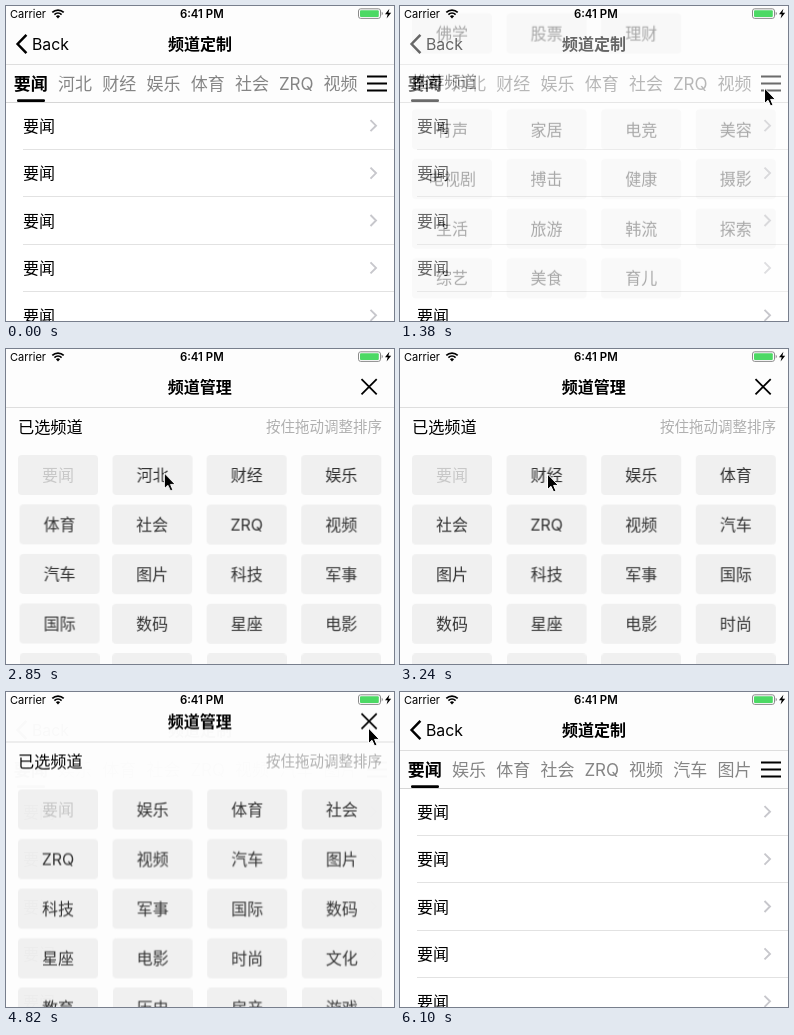
These frames come from a looping animation (388x315 px, 6430 ms). An HTML page:

```html
<!DOCTYPE html>
<html lang="zh-CN">
<head>
<meta charset="utf-8">
<title>频道定制</title>
<style>
html, body { margin: 0; width: 100%; height: 100%; overflow: hidden; background: #fff; }
svg { display: block; width: 388px; height: 315px; }
text { font-family: Inter, "Noto Sans CJK SC", "Noto Sans CJK", sans-serif; white-space: pre; }
</style>
</head>
<body>
<svg id="stage" viewBox="0 0 388 315"></svg>
<script>
const LOOP = 6430;
const NS = 'http://www.w3.org/2000/svg';
const stage = document.getElementById('stage');

function add(parent, tag, attrs = {}) {
  const el = document.createElementNS(NS, tag);
  for (const key in attrs) el.setAttribute(key, attrs[key]);
  parent.appendChild(el);
  return el;
}
const group = parent => add(parent, 'g');

function rect(parent, x, y, width, height, fill, rx = 0) {
  return add(parent, 'rect', { x, y, width, height, fill, rx });
}
function line(parent, d, stroke, width) {
  return add(parent, 'path', { d, stroke, fill: 'none', 'stroke-width': width });
}
// Text placed by its vertical centre
function label(parent, str, x, cy, size, fill = '#000', anchor = 'start', weight = 400) {
  const el = add(parent, 'text', {
    x, y: cy + size * 0.37, fill, 'font-size': size, 'font-weight': weight, 'text-anchor': anchor
  });
  el.textContent = str;
}

// steps: [time, properties, easing towards the next step]
function play(el, steps) {
  const all = [[0, steps[0][1]], ...steps, [LOOP, steps[steps.length - 1][1]]];
  el.animate(
    all.map(([t, props, easing = 'linear']) => ({ offset: t / LOOP, easing, ...props })),
    { duration: LOOP, iterations: Infinity }
  );
}
const at = (x, y) => ({ transform: `translate(${x}px, ${y}px)` });
const show = { opacity: 1 }, hide = { opacity: 0 };
const EASE = 'ease-in-out';
const GLIDE = 'cubic-bezier(.3, .1, .6, 1)';

const OPEN = [1212, 1582];
const CUTS = [[2830, 3225], [3630, 4000]];
const CLOSE = [4790, 5180];

const chosen = ('要闻 河北 财经 娱乐 体育 社会 ZRQ 视频 汽车 图片 科技 军事 国际 数码 星座 电影 ' +
  '时尚 文化 教育 历史 房产 游戏 动漫 音乐 佛学 股票 理财').split(' ');
const offered = '有声 家居 电竞 美容 电视剧 搏击 健康 摄影 生活 旅游 韩流 探索 综艺 美食 育儿'.split(' ');

/* ---- list page ---- */
const home = group(stage);
rect(home, 0, 0, 388, 315, '#fff');
rect(home, 0, 0, 388, 96, '#fdfdfd');
line(home, 'M20.4 28.8L11.6 38L20.4 47.2', '#000', 2.5);
label(home, 'Back', 26, 38, 15.8);
label(home, '频道定制', 194, 38, 16, '#000', 'middle', 700);
rect(home, 0, 58, 388, 1, '#dedede');
rect(home, 0, 96, 388, 1, '#d6d6d6');

function tabs(names) {
  const g = group(home);
  names.slice(0, 8).forEach((name, i) =>
    label(g, name, 24.7 + 44.25 * i, 77.5, 17, i ? '#858585' : '#000', 'middle', i ? 400 : 700));
  return g;
}
const SWAP = CLOSE[0] - 90;
play(tabs(chosen), [[SWAP, show], [SWAP, hide]]);
play(tabs([chosen[0], ...chosen.slice(3)]), [[SWAP, hide], [SWAP, show]]);

rect(home, 11, 93.2, 28, 2.8, '#000', 1.2);
for (let i = 0; i < 3; i++) rect(home, 361, 69.5 + 7 * i, 20, 2, '#000');

for (let i = 0; i < 5; i++) {
  const cy = 119.7 + 47.4 * i;
  label(home, '要闻', 17, cy + 0.4, 16);
  line(home, `M364.5 ${cy - 5.5}L370 ${cy}L364.5 ${cy + 5.5}`, '#c7c7cc', 1.9);
  rect(home, 17, Math.floor(143 + 47.5 * i), 371, 1, '#e2e2e2');
}

/* ---- channel manager ---- */
const PANEL_H = 690;
const panel = group(stage);
rect(panel, 0, 0, 388, PANEL_H, '#fdfdfd');
label(panel, '频道管理', 193.7, 38, 16, '#000', 'middle', 700);
line(panel, 'M355.5 30.2L370.7 45.4M370.7 30.2L355.5 45.4', '#000', 1.8);
rect(panel, 0, 58, 388, 1, '#dedede');
label(panel, '已选频道', 12, 78, 16.2);
label(panel, '按住拖动调整排序', 376, 78, 14.5, '#b0b0b0', 'end');
label(panel, '推荐频道', 12, 471.6, 16.2);

const slot = (i, top) => at(12 + 94.6 * (i % 4), top + 49.6 * Math.floor(i / 4));

function cell(name, place, fill = '#333') {
  const g = group(panel);
  rect(g, 0, 0, 80, 40, '#f0f0f0', 4);
  label(g, name, 40, 20, 16, fill, 'middle');
  g.style.transform = place.transform;
  return g;
}
const fade = (el, [start, end], from, to) => play(el, [[start, from, EASE], [end, to]]);

// The first removed channel joins the end of the offered ones
[...offered, chosen[1]].forEach((name, i) => {
  const g = cell(name, slot(i, 499.6));
  if (i === offered.length) fade(g, CUTS[0], hide, show);
});

// Each cut removes the second cell; every later cell moves back one slot
chosen.forEach((name, i) => {
  let place = slot(i, 106);
  const g = cell(name, place, i ? '#333' : '#c8c8c8');
  const steps = [];
  CUTS.forEach(([start, end], n) => {
    const next = i > n + 1 ? slot(i - n - 1, 106) : place;
    steps.push([start, place, EASE], [end, next]);
    place = next;
  });
  play(g, steps);
  if (CUTS[i - 1]) fade(g, CUTS[i - 1], show, hide);
});

const above = { ...at(0, -PANEL_H), ...hide };
const shown = { ...at(0, 0), ...show };
play(panel, [[OPEN[0], above, EASE], [OPEN[1], shown], [CLOSE[0], shown, EASE], [CLOSE[1], above]]);

/* ---- status bar ---- */
const bar = group(stage);
label(bar, 'Carrier', 4, 8, 11);
line(bar, 'M46.3 6.4A8.2 8.2 0 0 1 57.7 6.4', '#000', 1.7);
line(bar, 'M48.4 8.6A5.2 5.2 0 0 1 55.6 8.6', '#000', 1.6);
add(bar, 'path', { d: 'M52 12.6L49.9 10.3A3 3 0 0 1 54.1 10.3Z' });
label(bar, '6:41 PM', 195.8, 8, 11.4, '#000', 'middle', 600);
add(bar, 'rect', { x: 352.5, y: 2.8, width: 22, height: 9.6, rx: 2.2, fill: 'none', stroke: '#8a8a8a' });
rect(bar, 354, 4.3, 18.8, 6.6, '#4cd964', 1);
add(bar, 'path', { d: 'M375.7 5.8A2 2 0 0 1 375.7 9.4Z', fill: '#8a8a8a' });
add(bar, 'path', { d: 'M383.4 2.8L379 8.3H381.7L380.6 12.6L385.2 6.8H382.4Z' });

/* ---- pointer ---- */
const pointer = add(stage, 'path', {
  d: 'M0.5 0V15.6L4 12.3L6.6 18L9 17L6.6 11.4H11.4Z',
  fill: '#000', stroke: '#fff', 'stroke-linejoin': 'round'
});
// Each move: start, end, destination
const moves = [
  [300, 940, 364, 82],
  [1800, 2310, 158, 124],
  [2840, 3200, 147, 125],
  [3640, 3950, 152, 124],
  [4060, 4560, 362, 36, 'ease'],
  [5225, 5870, 375, 310, EASE],
  [6010, 6100, 377, 320]
];
let spot = at(372, 319);
play(pointer, moves.flatMap(([start, end, x, y, easing = GLIDE]) => {
  const from = spot;
  spot = at(x, y);
  return [[start, from, easing], [end, spot]];
}));
</script>
</body>
</html>
```
